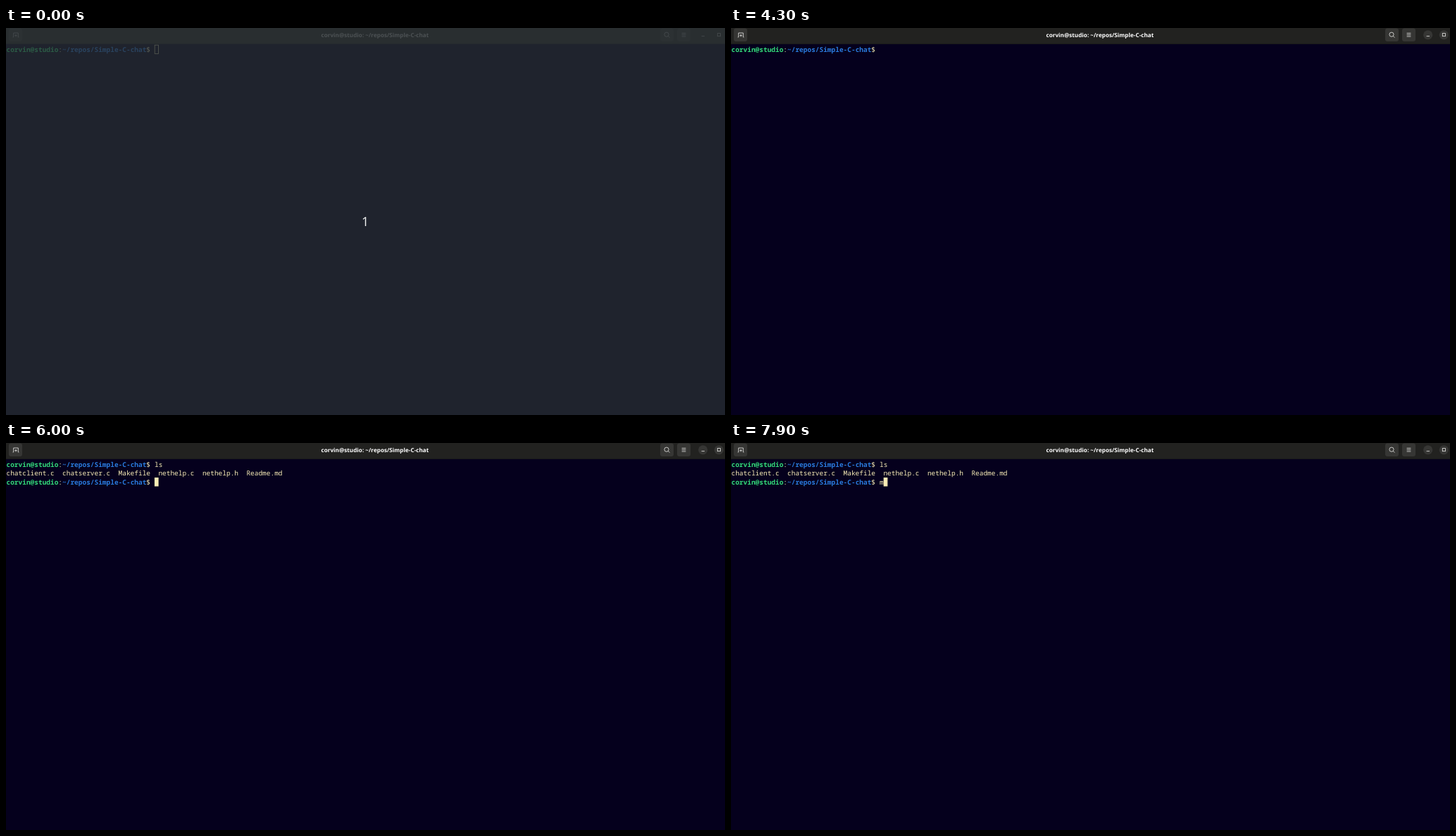
These frames come from a looping animation (1021x549 px, 8 s). An HTML page:

```html
<!DOCTYPE html>
<html lang="en">
<head>
<meta charset="utf-8">
<title>Terminal</title>
<style>
  html, body { margin: 0; width: 100%; height: 100%; overflow: hidden; background: #05001d; }
  svg { display: block; width: 1021px; height: 549px; }
  text { white-space: pre; text-rendering: geometricPrecision; }

  .term { font: 9.48px "Noto Sans Mono", monospace; fill: #f7ecb6; }
  .user { fill: #33da7a; font-weight: 700; }
  .path { fill: #2a7bde; font-weight: 700; }
  .title { font: 700 8.16px "Open Sans", "Noto Sans", sans-serif; text-anchor: end; fill: currentColor; }
  .count { font: 18px "Open Sans", "Noto Sans", sans-serif; text-anchor: middle; fill: #f4f5f5; }
  .icon { fill: none; stroke: currentColor; stroke-width: .8; }
  .button { fill: #363634; }

  .bar, .icons, .title, .round, .idle, .block, .dim, .ls, .output, .m {
    animation: 8s step-end infinite;
  }
  .bar    { animation-name: bar; }
  .icons  { animation-name: icons; }
  .title  { animation-name: title; }
  .round  { animation-name: focused; }
  .idle   { animation-name: idle; }
  .block  { animation-name: cursor; }
  .dim    { animation-name: dim; }
  .ls     { animation-name: ls; }
  .output { animation-name: output; }
  .m      { animation-name: m; }

  @keyframes bar     { 0% { fill: #2a2a28; } 47.5%, 100% { fill: #222220; } }
  @keyframes icons   { 0% { color: #a4a4a1; } 47.5%, 100% { color: #ebebe9; } }
  @keyframes title   { 0% { color: #b6b6b3; } 47.5%, 100% { color: #fff; } }
  @keyframes focused { 0% { opacity: 0; } 47.5%, 100% { opacity: 1; } }
  @keyframes idle    { 0% { opacity: 1; } 47.5%, 100% { opacity: 0; } }
  @keyframes dim     { 0% { opacity: 1; } 1.25%, 100% { opacity: 0; } }
  @keyframes ls      { 0% { opacity: 0; } 65%, 100% { opacity: 1; } }
  @keyframes output  { 0% { opacity: 0; } 73.75%, 100% { opacity: 1; } }
  @keyframes m {
    0%, 96.25% { opacity: 0; }
    88.75%, 98.75%, 100% { opacity: 1; }
  }
  /* blinks, and moves by cells of 5.69 x 12.5 */
  @keyframes cursor {
    0%     { opacity: 0; transform: none; }
    47.5%  { opacity: 1; transform: none; }
    53.75% { opacity: 0; transform: none; }
    61.25% { opacity: 1; transform: none; }
    65%    { opacity: 1; transform: translate(11.38px, 0); }
    72.5%  { opacity: 0; transform: translate(11.38px, 0); }
    73.75% { opacity: 1; transform: translate(0, 25px); }
    81.25% { opacity: 0; transform: translate(0, 25px); }
    87.5%  { opacity: 1; transform: translate(0, 25px); }
    88.75% { opacity: 1; transform: translate(5.69px, 25px); }
    95%    { opacity: 0; transform: translate(5.69px, 25px); }
    96.25% { opacity: 1; transform: translate(0, 25px); }
    98.75%, 100% { opacity: 1; transform: translate(5.69px, 25px); }
  }
</style>
</head>
<body>
<svg viewBox="0 0 1021 549">
  <defs>
    <text id="prompt" class="term" x=".5"><tspan class="user">corvin@studio</tspan>:<tspan class="path">~/repos/Simple-C-chat</tspan>$</text>
  </defs>

  <rect width="1021" height="549" fill="#05001d"/>
  <rect class="bar" width="1021" height="23"/>
  <rect y="22" width="1021" height="1" fill="#1a1a1a"/>

  <g class="button">
    <rect x="4" y="0.5" width="19" height="18.5" rx="3"/>
    <rect x="929" y="0.5" width="19" height="18.5" rx="3"/>
    <rect x="953" y="0.5" width="19" height="18.5" rx="3"/>
    <g class="round">
      <circle cx="989.7" cy="9.8" r="6.6"/>
      <circle cx="1012.3" cy="9.8" r="6.6"/>
    </g>
  </g>
  <g class="icons">
    <g class="icon">
      <path d="M9.6 13H10.7V7H17.3V13H18.4M14 9v3.4M12.3 10.7h3.4"/>
      <circle cx="938" cy="9.2" r="3.1"/>
      <path d="M940.2 11.4l2.2 2.2"/>
      <path d="M959.6 7.4h5.8M959.6 9.7h5.8M959.6 12h5.8"/>
      <path d="M987.6 11.6h4.4"/>
      <rect x="1010.3" y="7.6" width="4.1" height="4.1"/>
    </g>
  </g>
  <text class="title" x="600.3" y="12.5">corvin@studio: ~/repos/Simple-C-chat</text>

  <use href="#prompt" y="33.5"/>
  <text class="term ls" x="211" y="33.5">ls</text>
  <g class="output">
    <text class="term" x=".5" y="46">chatclient.c  chatserver.c  Makefile  nethelp.c  nethelp.h  Readme.md</text>
    <use href="#prompt" y="58.5"/>
  </g>
  <text class="term m" x="211" y="58.5">m</text>

  <rect class="idle" x="211.2" y="24.2" width="5.3" height="12.3" fill="none" stroke="#d8d0a6" stroke-width=".8"/>
  <rect class="block" x="210.9" y="24" width="5.7" height="12.5" fill="#f9edb5"/>

  <g class="dim">
    <rect width="1021" height="549" fill="#292f33" fill-opacity=".75"/>
    <text class="count" x="510.2" y="280.5">1</text>
  </g>
</svg>
</body>
</html>
```
